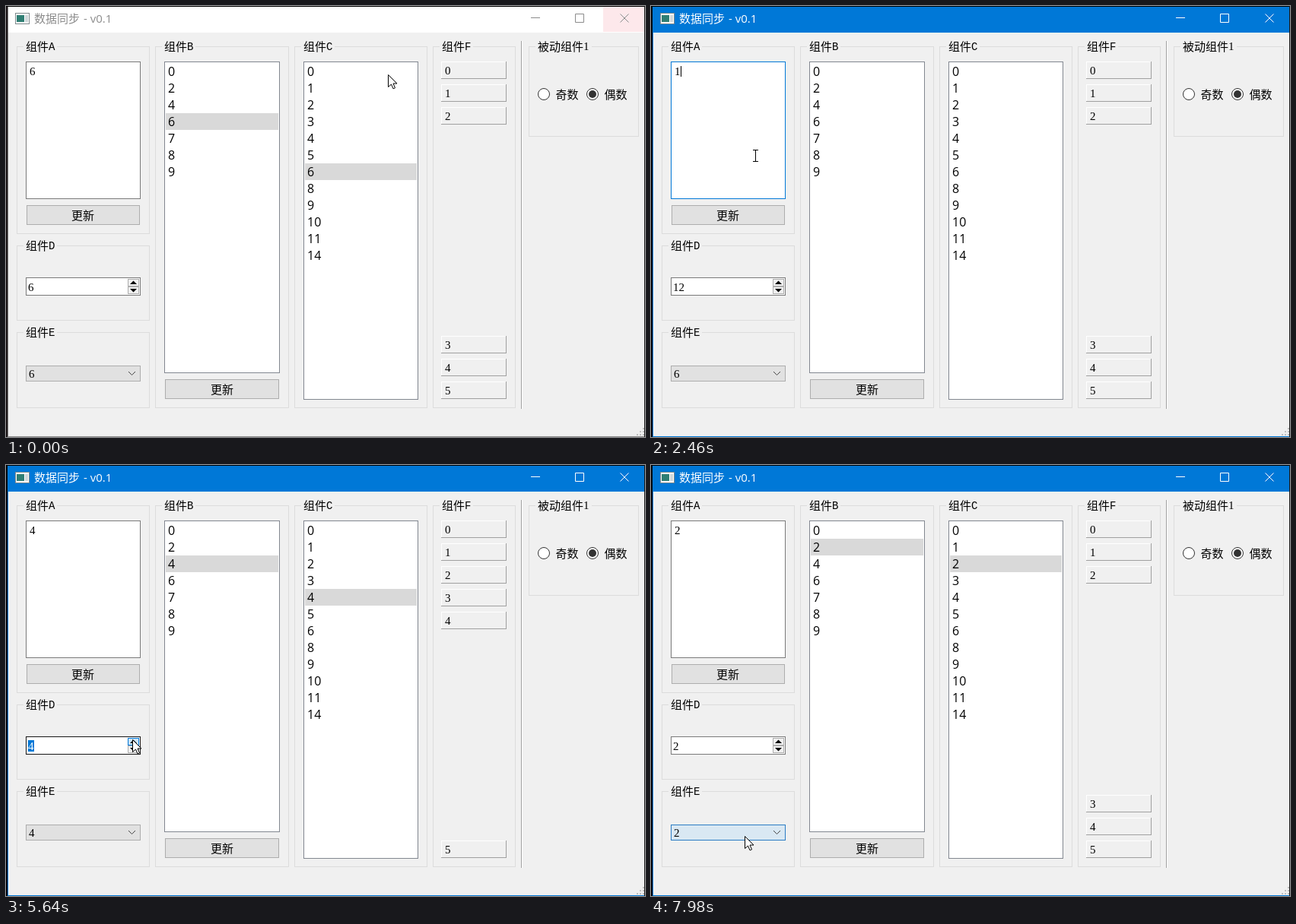
Recreate the animation shown at these times as an HTML page with a canvas. Size 840 by 567 pixels, loop 8000 ms.

```html
<!DOCTYPE html>
<html lang="zh">
<head>
<meta charset="utf-8">
<style>
html, body { margin: 0; width: 100%; height: 100%; overflow: hidden; }
canvas { display: block; }
</style>
</head>
<body>
<canvas id="stage" width="840" height="567"></canvas>
<script>
const g = document.getElementById('stage').getContext('2d');
const LOOP = 8000, STEP = 60, MOVE = 240, BLUE = '#0078d7';
const CJK = '300 15px "Noto Sans CJK SC", "Noto Sans CJK", sans-serif';
const SERIF = '15px "Liberation Serif", serif';
const MONO = '14px "Liberation Mono", monospace';
const LIST = '16px "Open Sans", "Noto Sans", sans-serif';
const TITLE = '15px "Open Sans", "Noto Sans", sans-serif';
const listB = [0, 2, 4, 6, 7, 8, 9];
const listC = [0, 1, 2, 3, 4, 5, 6, 8, 9, 10, 11, 14];
const listE = [0, 1, 2, 3, 4, 6];

// Pointer moves: start time and where it glides to
const update = [116, 277];
const moves = [
  [0, 250, 228], [360, 31, 88], [1140, 148, 217], [1500, ...update],
  [1980, 137, 197], [2520, ...update], [3060, 111, 88], [3300, 16, 101],
  [3780, ...update], [4200, 141, 354], [4560, 166, 356], [5220, 166, 361],
  [6900, 132, 475], [7380, 124, 536], [7740, 123, 488]
];

const type = (t, text) => [t, { text, key: t, sel: false }];
const enter = t => [t, { focus: 'A', key: t, active: true }];
const select = t => [t, { sel: true }];
const apply = (t, v) => [[t - 120, { press: true, focus: '' }], [t, { press: false, v }]];
const spin = (v, i) => [5400 + 285 * i, { focus: 'D', v }];

// State changes; v is the value shared by all components
const events = [
  enter(600), select(660), type(780, '1'), type(900, '12'), ...apply(1860, 12),
  enter(2280), type(2400, '1'), ...apply(2940, 1),
  enter(3300), select(3480), type(3660, '3'), ...apply(4200, 3),
  ...[4, 5, 6, 7, 8].map(spin),
  [7320, { focus: '', popup: true }], [7800, { popup: false, v: 2 }]
];

function stateAt(t) {
  const s = { v: 6, text: '6', e: 6, f: 2, odd: false };
  for (const [at, change] of events) {
    if (at > t) break;
    Object.assign(s, change);
    if (!('v' in change)) continue;
    s.text = String(s.v);
    if (listE.includes(s.v)) s.e = s.v;
    if (s.v < 6) s.f = s.v;
    s.odd = s.v % 2 === 1;
  }
  return s;
}

function pointerAt(t) {
  let x = 502, y = 90;
  for (const [at, tx, ty] of moves) {
    const k = Math.min(1, Math.max(0, (t - at) / MOVE)), ease = k * k * (3 - 2 * k);
    x += (tx - x) * ease;
    y += (ty - y) * ease;
  }
  return { x: Math.round(x), y: Math.round(y) };
}

const inside = (p, x, y, x2, y2) => p.x >= x && p.x <= x2 && p.y >= y && p.y <= y2;

function fill(x, y, w, h, color) {
  g.fillStyle = color;
  g.fillRect(x, y, w, h);
}

// Bordered box given by its inclusive corner pixels
function box(x, y, x2, y2, inner, edge) {
  fill(x, y, x2 - x + 1, y2 - y + 1, edge);
  fill(x + 1, y + 1, x2 - x - 1, y2 - y - 1, inner);
}

function text(s, x, y, font = SERIF, color = '#000') {
  g.font = font;
  g.fillStyle = color;
  g.fillText(s, x, y);
}

function paint(color, edge) {
  if (color) { g.fillStyle = color; g.fill(); }
  if (edge) { g.strokeStyle = edge; g.lineWidth = 1; g.stroke(); }
}

function shape(points, color, edge, close = true) {
  g.beginPath();
  points.forEach(([x, y]) => g.lineTo(x, y));
  if (close) g.closePath();
  paint(color, edge);
}

function disc(x, y, r, color, edge) {
  g.beginPath();
  g.arc(x, y, r, 0, 7);
  paint(color, edge);
}

// Small arrow head; dir 1 points down, -1 up
function chevron(x, y, dir, color, edge) {
  shape([[x - 4.5, y], [x, y + 4.5 * dir], [x + 4.5, y]], color, edge, !!color);
}

function group(x, y, x2, y2, cjk, tail) {
  box(x, y, x2, y2, '#f0f0f0', '#dcdcdc');
  const w = cjk.length * 15;
  fill(x + 9, y, w + 14, 1, '#f0f0f0');
  text(cjk, x + 12, y + 6, CJK);
  text(tail, x + 12 + w, y + 5, tail === '1' ? SERIF : MONO);
}

function button(x, y, x2, p, press) {
  const hover = inside(p, x, y, x2, y + 25);
  const [inner, edge] = press ? ['#d8e8f6', '#0a64ad'] : hover ? ['#e5f1fb', BLUE] : ['#e1e1e1', '#adadad'];
  box(x, y, x2, y + 25, inner, edge);
  text('更新', Math.floor((x + x2 - 29) / 2), y + 19, CJK);
}

function list(items, x, x2, y2, s, p) {
  box(x, 73, x2, y2, '#fff', '#828790');
  items.forEach((n, i) => {
    const y = 75 + 22 * i, w = x2 - x - 3;
    const hover = s.active && inside(p, x + 2, y, x2 - 2, y + 21);
    if (n === s.v) fill(x + 2, y, w, 22, '#d9d9d9');
    else if (hover) fill(x + 2, y, w, 22, '#e5f3ff');
    text(n, x + 5, y + 17, LIST);
  });
}

function radio(x, label, on) {
  disc(x, 116, 7.5, '#fff', '#333');
  if (on) disc(x, 116, 5, '#333');
  text(label, x + 15.5, 122, CJK);
}

function frame(s, t) {
  fill(0, 0, 840, 567, '#f0f0f0');
  fill(0, 0, 2, 567, s.active ? '#000' : '#1c1618');
  fill(2, 1, 1, 566, s.active ? BLUE : '#777');
  fill(2, 566, 837, 1, s.active ? BLUE : '#8a8a8a');
  fill(3, 1, 836, 34, s.active ? BLUE : '#fff');
  if (t < STEP) fill(785, 1, 54, 33, '#fde8eb');
  fill(0, 0, 840, 1, '#000');
  fill(839, 0, 1, 567, '#1a1a1a');
  const ink = s.active ? '#fff' : '#8c8c8c';
  box(12, 9, 30, 23, '#fff', '#7d8a8c');
  fill(14, 12, 10, 9, '#2f7f74');
  fill(25, 12, 4, 9, '#cfd8da');
  text('数据同步', 37, 22, CJK, ink);
  text('- v0.1', 102, 22, TITLE, ink);
  fill(690, 15, 12, 1, ink);
  shape([[748.5, 10.5], [759.5, 10.5], [759.5, 21.5], [748.5, 21.5]], null, ink);
  for (const d of [-5.5, 5.5])
    shape([[813 - d, 10.5], [813 + d, 21.5]], null, ink, false);
  for (let i = 0; i < 3; i++)
    for (let j = 2 - i; j < 3; j++) fill(829 + 4 * i, 555 + 4 * j, 2, 2, '#bfbfbf');
}

function editor(s, t, p) {
  group(14, 53, 188, 299, '组件', 'A');
  const focus = s.focus === 'A', end = 31 + 7.5 * s.text.length;
  box(26, 73, 176, 253, '#fff', focus ? BLUE : '#7a7a7a');
  if (s.sel) fill(31, 78, end - 31, 16, BLUE);
  text(s.text, 31, 91, SERIF, s.sel ? '#fff' : '#000');
  if (focus && !s.sel && (t - s.key) % 1060 < 530) fill(Math.round(end), 79, 1, 14, '#000');
  button(27, 262, 175, p, s.press);
}

function spinner(s, p) {
  group(14, 315, 188, 413, '组件', 'D');
  const hover = inside(p, 26, 357, 176, 380), focus = s.focus === 'D';
  box(26, 357, 176, 380, '#fff', hover ? '#171717' : focus ? BLUE : '#7a7a7a');
  if (focus) fill(29, 362, 8, 15, BLUE);
  text(s.v, 29, 375, SERIF, focus ? '#fff' : '#000');
  const up = inside(p, 160, 358, 176, 368);
  box(160, 359, 174, 368, up ? '#cce4f7' : '#f0f0f0', up ? BLUE : '#adadad');
  box(160, 369, 174, 378, '#f0f0f0', '#adadad');
  chevron(167.5, 366, -1, '#000');
  chevron(167.5, 372, 1, '#000');
}

function combo(s, p, lagged) {
  group(14, 429, 188, 528, '组件', 'E');
  const hover = inside(lagged, 26, 473, 176, 493);
  const [inner, edge] = s.popup ? ['#cce4f7', '#005499'] : hover || s.v === 2 ? ['#d9e8f3', '#2a7cc4'] : ['#e1e1e1', '#adadad'];
  box(26, 473, 176, 493, inner, edge);
  text(s.e, 30, 489);
  chevron(165.5, 481, 1, null, '#444');
  if (!s.popup) return;
  box(26, 494, 176, 610, '#fff', '#646464');
  listE.forEach((n, i) => {
    const y = 495 + 18 * i;
    const on = p.y < 495 ? n === s.e : p.y >= y && p.y < y + 18;
    if (on) fill(27, y, 149, 18, BLUE);
    text(n, 30, y + 14, SERIF, on ? '#fff' : '#000');
  });
}

function slots(s) {
  group(561, 53, 669, 528, '组件', 'F');
  for (let i = 0; i < 6; i++) {
    const y = (i <= s.f ? 73 : 344) + 30 * i;
    fill(572, y, 86, 23, '#a0a0a0');
    fill(572, y, 85, 22, '#fff');
    fill(573, y + 1, 84, 21, '#f0f0f0');
    text(i, 577, y + 17);
  }
}

function pointer(p, t) {
  const dragging = t >= 3300 && t < 3780;
  if (dragging || inside(p, 27, 74, 175, 252) || inside(p, 27, 358, 159, 379)) {
    fill(p.x, p.y - 8, 1, 16, '#000');
    for (const y of [p.y - 8, p.y + 7]) {
      fill(p.x - 3, y, 3, 1, '#000');
      fill(p.x + 1, y, 3, 1, '#000');
    }
    return;
  }
  const arrow = [[0, 0], [0, 16], [4, 12.5], [6.5, 18.3], [9, 17.3], [6.5, 11.5], [11.5, 11.5]];
  shape(arrow.map(([x, y]) => [p.x + x + .5, p.y + y + .5]), '#fff', '#000');
}

function draw(now) {
  const t = Math.floor(now % LOOP / STEP) * STEP;
  const s = stateAt(t), p = pointerAt(t);
  frame(s, t);
  editor(s, t, p);
  spinner(s, p);
  group(196, 53, 371, 528, '组件', 'B');
  list(listB, 208, 359, 482, s, p);
  button(209, 491, 358, p);
  group(379, 53, 553, 528, '组件', 'C');
  list(listC, 391, 541, 517, s, p);
  slots(s);
  fill(677, 46, 1, 484, '#a0a0a0');
  fill(678, 46, 1, 484, '#fff');
  group(687, 53, 831, 171, '被动组件', '1');
  radio(707, '奇数', s.odd);
  radio(771, '偶数', !s.odd);
  combo(s, p, pointerAt(t - STEP));
  pointer(p, t);
}

let start;
function tick(now) {
  start ??= now;
  draw(now - start);
  requestAnimationFrame(tick);
}
requestAnimationFrame(tick);
</script>
</body>
</html>
```
